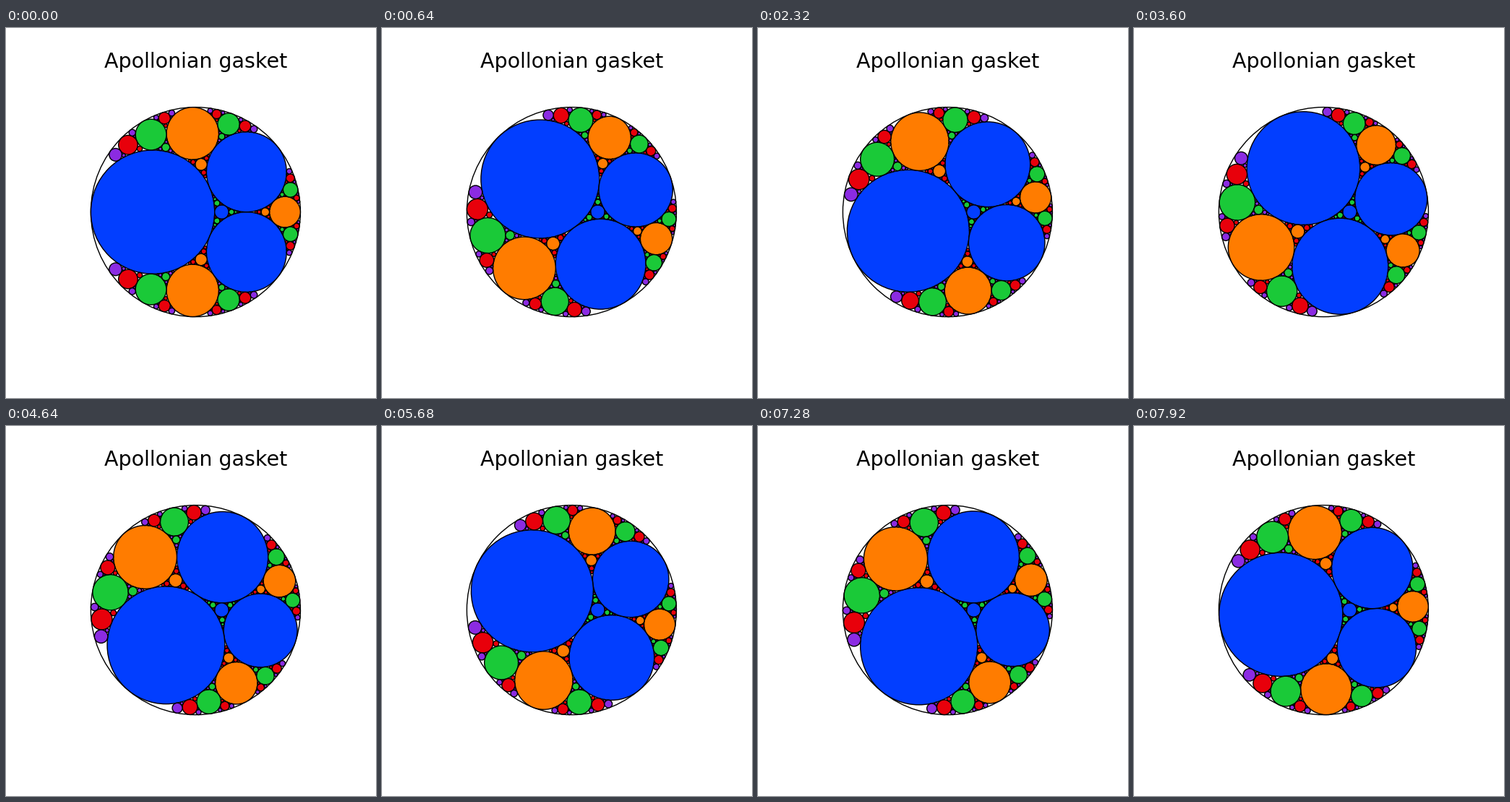
A matplotlib script that plays this animation: 512 by 512 pixels, repeating every 8000 ms.

```python
import math

import matplotlib.pyplot as plt
from matplotlib.animation import FuncAnimation
from matplotlib.patches import Circle

SIZE = 512
DPI = 102.4
FRAMES = 100
INTERVAL = 80

CENTER_X, CENTER_Y, RADIUS = 262.4, 254.6, 145  # pixels, y from the top
SHIFT = 0.25  # moves the inner circle off centre
COLORS = ["#023eff", "#ff7c00", "#1ac938", "#e8000b", "#8b2be2"]


def unit(angle):
    return complex(math.cos(angle), math.sin(angle))


def invert(circle, mirror):
    """Reflect a circle in a mirror circle; both are (centre, radius)."""
    (c, r), (o, big_r) = circle, mirror
    d = c - o
    scale = big_r**2 / (abs(d) ** 2 - r**2)
    return o + scale * d, abs(scale) * r


def gasket(depth):
    """Circles (centre, radius, level) of the symmetric gasket in the unit disc."""
    s = math.sin(math.pi / 3)
    rho = (1 - s) / (1 + s)
    inner = (0j, rho)
    axes = [unit(2 * math.pi * k / 3) for k in range(3)]
    ring = [(-(1 + rho) / 2 * u, (1 - rho) / 2) for u in axes]
    mirrors = [(2 * u, math.sqrt(3)) for u in axes] + [(0j, math.sqrt(rho))]

    found = [(c, r, 0) for c, r in ring + [inner]]
    # Each seed pair is moved first by its own mirror.
    layer = [(invert(seed, mirrors[k]), k)
             for k in range(3) for seed in (ring[k], inner)]
    for level in range(1, depth + 1):
        found += [(c, r, level) for (c, r), _ in layer]
        layer = [(invert(circle, m), k)
                 for circle, last in layer
                 for k, m in enumerate(mirrors) if k != last]
    return found


def mobius(z):
    return (z + SHIFT) / (1 + SHIFT * z)


def mobius_circle(c, r):
    """Image of a circle, from its diameter on the line through the pole."""
    d = c + 1 / SHIFT
    step = r * d / abs(d)
    p, q = mobius(c + step), mobius(c - step)
    return (p + q) / 2, abs(p - q) / 2


fig = plt.figure(figsize=(SIZE / DPI, SIZE / DPI), dpi=DPI, facecolor="white")
ax = fig.add_axes([0, 0, 1, 1])
ax.set_axis_off()
ax.set_xlim(-CENTER_X / RADIUS, (SIZE - CENTER_X) / RADIUS)
ax.set_ylim((CENTER_Y - SIZE) / RADIUS, CENTER_Y / RADIUS)

fig.text(CENTER_X / SIZE, 1 - 55 / SIZE, "Apollonian gasket",
         fontsize=20, family="DejaVu Sans", ha="center", va="baseline")

ax.add_patch(Circle((0, 0), 1, fc="white", ec="black", lw=1))
circles = gasket(len(COLORS) - 1)
patches = [ax.add_patch(Circle((0, 0), 1, fc=COLORS[level], ec="black", lw=1))
           for _, _, level in circles]


def update(frame):
    turn = unit(-2 * math.pi * frame / FRAMES)
    for patch, (c, r, _) in zip(patches, circles):
        center, radius = mobius_circle(c * turn, r)
        patch.center = center.real, center.imag
        patch.radius = radius
    return patches


anim = FuncAnimation(fig, update, frames=FRAMES, interval=INTERVAL,
                     init_func=lambda: update(0), repeat=True, repeat_delay=0)
plt.show()
```
